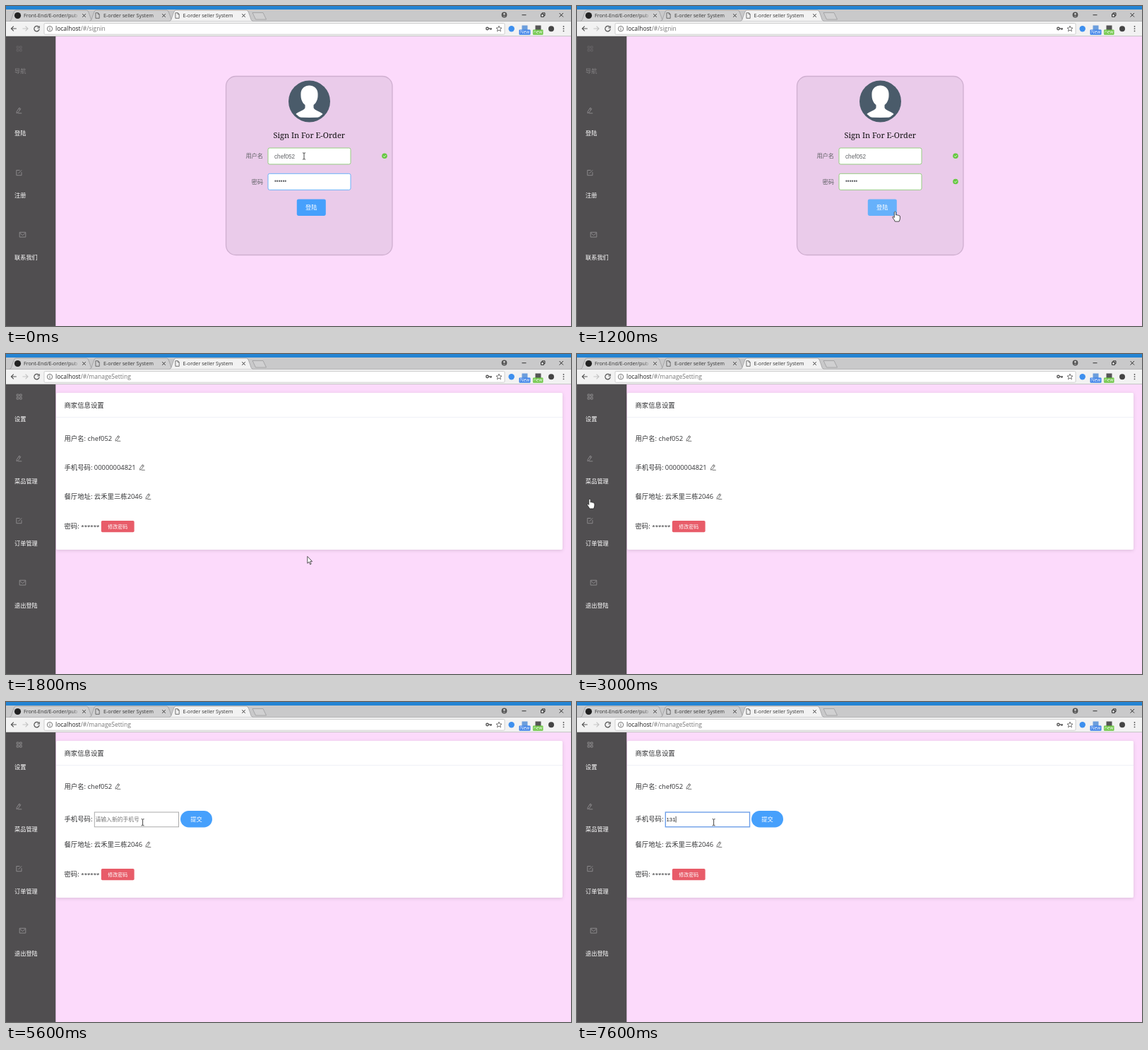
An HTML page that plays this animation: 800x453 px, repeating every 8000 ms.

```html
<!DOCTYPE html>
<html lang="zh-CN">
<head>
<meta charset="utf-8">
<title>E-order seller System</title>
<style>
  html, body { margin: 0; width: 100%; height: 100%; overflow: hidden; background: #fcdafb; }
  svg { display: block; width: 100%; height: 100%; }
  text { font: 9.37px "Open Sans", "Noto Sans CJK SC", sans-serif; fill: #303133; white-space: pre; }
  .tab { font-size: 7.2px; fill: #333; }
  .url { font-size: 8.5px; fill: #777; }
  .menu text { font-size: 8.2px; font-weight: 500; fill: #fff; }
  .menu use { stroke: #918f91; }
  .menu .dim text { fill: #858385; font-weight: 400; }
  .menu .dim use { stroke: #686668; }
  .form text { font-size: 8.2px; fill: #606266; }
  .form .field { font-family: "Liberation Sans", sans-serif; }
  .form .heading { font: 11.03px "Noto Serif", serif; fill: #111; }
  .end { text-anchor: end; }
  .mid { text-anchor: middle; }
  .form .white, .white { fill: #fff; font-size: 8.2px; font-weight: 500; }
  .badge { font: 6.4px "Open Sans", sans-serif; fill: #fff; }
  .line { fill: none; stroke: #555; }
</style>
</head>
<body>
<svg viewBox="0 0 800 453" preserveAspectRatio="none">
  <defs>
    <filter id="shadow" x="-5%" y="-15%" width="110%" height="135%">
      <feDropShadow dx="0" dy="1.2" stdDeviation="2.6" flood-color="#000" flood-opacity=".13"/>
    </filter>
    <clipPath id="avatarClip"><circle cx="429.5" cy="135" r="26"/></clipPath>
    <linearGradient id="tabFade" x1="0" x2="1">
      <stop offset="0" stop-color="#d0d0d1" stop-opacity="0"/><stop offset="1" stop-color="#d0d0d1"/>
    </linearGradient>
    <path id="tabShape" d="M0 21.5C3 21 3 19 4 16L6.5 9Q7.5 6 9.5 6H109.500Q111.500 6 112.500 9L115 16C116 19 116 21 119 21.500"/>
    <path id="doc" d="M-2.600 -3.800H.8L2.700 -1.800V3.800H-2.600ZM.8 -3.800V-1.800H2.700"/>
    <path id="cross" d="M-2.200 -2.200L2.200 2.200M2.200 -2.200L-2.200 2.200"/>
    <path id="grid" d="M-3.500 -3.500H-.8V-.8H-3.500ZM.8 -3.500H3.500V-.8H.8ZM-3.500 .8H-.8V3.500H-3.500ZM.8 .8H3.500V3.500H.8Z"/>
    <path id="pen" d="M-1.500 3.800H3.800M-3.300 1.400L.3 -3.900L2.300 -2.500L-1.300 2.700L-3.500 3.700ZM-.6 -2.600L1.400 -1.200"/>
    <path id="compose" d="M1 -3.500H-3.700V3.700H3.500V-.8M-1.200 1.200L3.700 -3.700"/>
    <path id="mail" d="M-4.300 -3.400H4.300V3.400H-4.300ZM-4 -2.400L0 .8L4 -2.400"/>
    <g id="check">
      <circle r="3.800" fill="#67c843"/>
      <path d="M-1.700 .1L-.4 1.300L1.800 -1" fill="none" stroke="#fff" stroke-width=".9"/>
    </g>
    <path id="arrow" d="M0 0V9.800L2.200 7.800L3.800 11.400L5.300 10.700L3.800 7.200H6.800Z" fill="#fff" stroke="#222" stroke-width=".75"/>
    <path id="hand" d="M-1.200 .9Q0 -.9 1.200 .9V5Q2.500 4 3.300 5.200Q4.600 4.500 5.200 5.700Q6.900 5.500 6.900 7V10Q6.500 12 5.600 14H-.3Q-1 11.800 -3.300 9Q-4.300 7.200 -2.700 7.200L-1.200 8.500Z" fill="#fff" stroke="#222" stroke-width=".8"/>
    <path id="beam" d="M-2 -4.600Q0 -4.800 0 -3.800Q0 -4.800 2 -4.600M0 -3.800V3.800M-2 4.600Q0 4.800 0 3.800Q0 4.800 2 4.600" fill="none" stroke="#333" stroke-width=".9"/>
  </defs>

  <rect width="800" height="453" fill="#fcdafb"/>

  <!-- Browser window -->
  <rect width="800" height="22" fill="#c9c9ca"/>
  <rect width="800" height="5" fill="#2484d3"/>
  <g stroke="#969697" stroke-width=".7">
    <use href="#tabShape" x="4.500" fill="#d0d0d1"/>
    <use href="#tabShape" x="118" fill="#d0d0d1"/>
    <path d="M349 9.500H364L368.500 19H353.500Z" fill="#d0d0d1"/>
    <path d="M0 21.500H800"/>
    <use href="#tabShape" x="231" fill="#f2f2f2"/>
  </g>
  <rect y="21.800" width="800" height="21.200" fill="#f2f2f2"/>
  <path d="M0 42.600H800" stroke="#b8b8b8" stroke-width=".8"/>
  <circle cx="16.500" cy="13.500" r="4.600" fill="#222"/>
  <text class="tab" x="25" y="16">Front-End/E-order/pub</text>
  <rect x="92" y="8" width="13" height="11" fill="url(#tabFade)"/>
  <text class="tab" x="138" y="16">E-order seller System</text>
  <text class="tab" x="250.500" y="16">E-order seller System</text>
  <g class="line" stroke-width=".8">
    <use href="#doc" x="129.500" y="13.500"/><use href="#doc" x="242.500" y="13.500"/>
  </g>
  <g class="line" style="stroke:#333" stroke-width="1">
    <use href="#cross" x="110.500" y="13.500"/><use href="#cross" x="223.500" y="13.500"/><use href="#cross" x="336.500" y="13.500"/>
    <path d="M730.500 12.700H736.500M757.500 11.500H761.500V15.300H757.500ZM759 11.500V9.800H763V13.700H761.500M783.500 10L789 15.500M789 10L783.500 15.500"/>
  </g>
  <circle cx="705.500" cy="12.500" r="3.900" fill="#555"/>
  <path d="M703.300 14.600Q705.500 12.700 707.700 14.600Z" fill="#ddd"/>
  <circle cx="705.500" cy="11.200" r="1.300" fill="#ddd"/>

  <g class="line" stroke-width="1.200">
    <path d="M14.800 32H7.500M10.800 28.600L7.400 32L10.800 35.400"/>
    <path d="M23.500 32H31M27.600 28.600L31 32L27.600 35.400" stroke="#c4c4c4"/>
    <path d="M46.300 29.700A3.700 3.700 0 1 0 47.200 32.700M47.200 28.200V31H44.300"/>
  </g>
  <rect x="54" y="24.500" width="652" height="15.700" rx="1.500" fill="#fff" stroke="#c5c5c5" stroke-width=".8"/>
  <g class="line" stroke-width=".8">
    <circle cx="62" cy="32.200" r="3.700"/><path d="M62 31.500V34.300M62 29.900V30.700"/>
    <path d="M698 28.200L699.100 30.900L702 31.100L699.800 33L700.500 35.800L698 34.200L695.500 35.800L696.200 33L694 31.100L696.900 30.900Z"/>
    <circle cx="681.500" cy="32" r="1.700" stroke-width="1.400"/><path d="M683.500 32H688M686.500 32V34" stroke-width="1.400"/>
  </g>
  <text class="url" x="70" y="35.200"><tspan fill="#222">localhost</tspan><tspan id="path"></tspan></text>
  <circle cx="715.700" cy="32.200" r="4.200" fill="#3d8fee"/>
  <rect x="730.500" y="27.500" width="8" height="7" fill="#6c9edc"/>
  <rect x="749.500" y="27.500" width="8" height="7" fill="#555"/>
  <rect x="726.500" y="33.500" width="16" height="7.200" rx="1" fill="#3f83e8"/>
  <rect x="746" y="33.500" width="14.500" height="7.200" rx="1" fill="#6cc644"/>
  <text class="badge mid" x="734.500" y="39.200">New</text>
  <text class="badge mid" x="753.300" y="39.200">new</text>
  <circle cx="772" cy="32.200" r="4" fill="#444"/>
  <g fill="#555"><circle cx="789.500" cy="29" r=".9"/><circle cx="789.500" cy="32.200" r=".9"/><circle cx="789.500" cy="35.400" r=".9"/></g>

  <!-- Sidebar -->
  <rect y="43" width="70.300" height="410" fill="#504e50"/>
  <g class="menu" fill="none" stroke-width=".9">
    <g id="firstItem"><use href="#grid" x="18.700" y="60.500"/><text x="12" y="95.300"></text></g>
    <use href="#pen" x="18.500" y="148"/><text x="12" y="183.200"></text>
    <use href="#compose" x="18.500" y="236"/><text x="12" y="271"></text>
    <use href="#mail" x="23.500" y="323.700"/><text x="12" y="358.800"></text>
  </g>

  <!-- Sign-in card -->
  <g id="login" class="form">
    <rect x="311.500" y="99.500" width="235.500" height="253" rx="14" fill="#eacbea" stroke="#cfafd0" stroke-width="1.300"/>
    <circle cx="429.500" cy="135" r="29.500" fill="#4a5b6a"/>
    <g clip-path="url(#avatarClip)" fill="#fff">
      <path d="M417.500 126C416 108 443 108 441.500 126C442 134 437 142 429.500 142.500C422 142 417 134 417.500 126Z"/>
      <path d="M423.500 136H435.500V144C437 149 449 149 451 157Q430 159 408 157C410 149 422 149 423.500 144Z"/>
    </g>
    <text class="heading mid" x="429.300" y="186.700">Sign In For E-Order</text>
    <text class="end" x="364" y="215.300">用户名</text>
    <text class="end" x="364" y="251.500">密码</text>
    <g fill="#fff" stroke="#96cc82">
      <rect x="371" y="201" width="117" height="23" rx="2.300"/>
      <rect id="password" x="371" y="237.300" width="117" height="23" rx="2.300"/>
    </g>
    <text class="field" x="380" y="215.500">chef052</text>
    <text class="field" x="380" y="251.400">••••••</text>
    <use href="#check" x="536" y="212.300"/>
    <use id="passwordOk" href="#check" x="536" y="248.500"/>
    <rect id="signIn" x="411.800" y="273.500" width="41" height="23.400" rx="2.300"/>
    <text class="white mid" x="432.300" y="288.200">登陆</text>
  </g>

  <!-- Merchant settings -->
  <g id="settings">
    <rect id="panel" x="71" y="55" width="717" rx="2" fill="#fff" filter="url(#shadow)"/>
    <path d="M71 89.500H788" stroke="#ebeef5" stroke-width=".8"/>
    <text x="82.500" y="76.300">商家信息设置</text>
    <g id="rows">
      <text x="82.500" y="122.800">用户名: chef052</text>
      <text x="82.500" y="205.200">餐厅地址: 云禾里三栋2046</text>
      <text x="82.500" y="246.700">密码: </text>
      <text x="106.300" y="246.700" style="font-size:7.9px">******</text>
      <g class="line" stroke-width=".8"><use href="#pen" x="158.500" y="119.500"/><use href="#pen" x="201.500" y="201.700"/></g>
      <rect x="134.800" y="236" width="46.800" height="16.200" rx="1.800" fill="#e85c69"/>
      <text class="white mid" x="158.200" y="246.700" style="font-size:7.03px">修改密码</text>
      <g id="phoneView">
        <text x="82.500" y="163.900">手机号码: 00000004821</text>
        <use href="#pen" x="193" y="160.500" class="line" stroke-width=".8"/>
      </g>
      <g id="phoneEdit">
        <text x="82.500" y="168.600">手机号码:</text>
        <rect id="phoneBox" x="125.300" y="156" width="119.200" height="20.800" fill="#fff"/>
        <text id="phoneText" x="126.500" y="168.700" style="font-size:7.81px"></text>
        <rect id="caret" y="161.800" width=".8" height="8.800" fill="#222"/>
        <rect x="247" y="154" width="45" height="23.500" rx="11.700" fill="#46a0fc"/>
        <text class="white mid" x="269.500" y="168.800">提交</text>
      </g>
    </g>
  </g>
  <use id="cursor"/>
</svg>
<script>
const LOOP = 8000;
const $ = id => document.getElementById(id);
const labels = document.querySelectorAll('.menu text');
const menus = {
  guest: ['导航', '登陆', '注册', '联系我们'],
  seller: ['设置', '菜品管理', '订单管理', '退出登陆']
};
// Pointer poses held from each time on: ms, x, y, shape
const poses = [
  [0, 422, 212.5, 'beam'], [400, 455, 246, 'beam'], [600, 515, 292, 'arrow'],
  [800, 539, 308, 'arrow'], [1000, 490, 304, 'arrow'], [1200, 450.5, 291, 'hand'],
  [1600, 447.3, 290.5, 'arrow'], [1800, 426.8, 286.5, 'arrow'], [2000, 310, 284, 'arrow'],
  [2200, 160, 296, 'arrow'], [2400, 62, 304, 'hand'], [2600, 28, 304, 'hand'],
  [2800, 19, 262, 'hand'], [3000, 18, 205, 'hand'], [3200, 28, 165, 'hand'],
  [3400, 60, 143, 'hand'], [3600, 116, 130, 'arrow'], [3800, 161, 119, 'hand'],
  [4000, 165, 124, 'arrow'], [4200, 175.3, 139.3, 'arrow'], [4400, 187, 154, 'arrow'],
  [4600, 191.5, 160, 'hand'], [4800, 193, 164, 'beam'], [5000, 195, 168, 'beam'],
  [5400, 194.3, 169, 'beam'], [5600, 193.6, 170.3, 'beam']
];

const set = (id, attrs) => {
  for (const [name, value] of Object.entries(attrs)) $(id).setAttribute(name, value);
};
const show = (id, visible) => set(id, { display: visible ? 'inline' : 'none' });

function draw(t) {
  const signedIn = t >= 1600, loaded = t >= 1800;
  const blurred = t >= 800, editing = t >= 4800, focused = t >= 6000;

  $('path').textContent = signedIn ? '/#/manageSetting' : '/#/signin';
  menus[signedIn ? 'seller' : 'guest'].forEach((label, i) => labels[i].textContent = label);
  set('firstItem', { class: signedIn ? '' : 'dim' });

  show('login', !signedIn);
  set('password', { stroke: blurred ? '#96cc82' : '#6bb2f8' });
  show('passwordOk', blurred);
  set('signIn', { fill: t >= 1200 ? '#66b1fb' : '#46a0fc' });

  show('settings', signedIn);
  set('panel', { height: loaded ? 222 : 58 });
  show('rows', loaded);
  show('phoneView', !editing);
  show('phoneEdit', editing);

  const typed = '131'.slice(0, Math.max(0, Math.floor((t - 7000) / 200)));
  set('phoneBox', { stroke: focused ? '#6e9fe8' : '#aaa', 'stroke-width': focused ? 1.4 : 1 });
  $('phoneText').textContent = typed || '请输入新的手机号';
  $('phoneText').style.fill = typed ? '#222' : '#777';
  $('phoneText').style.fontFamily = typed ? '"Liberation Sans", sans-serif' : '';
  show('caret', focused && (t < 6400 || t >= 7000));
  set('caret', { x: 126.6 + typed.length * 4.35 });

  const [, x, y, shape] = poses.findLast(pose => pose[0] <= t);
  set('cursor', { href: '#' + shape, x, y });
}

const start = performance.now();
function tick() {
  draw((performance.now() - start) % LOOP);
  requestAnimationFrame(tick);
}
tick();
</script>
</body>
</html>
```
